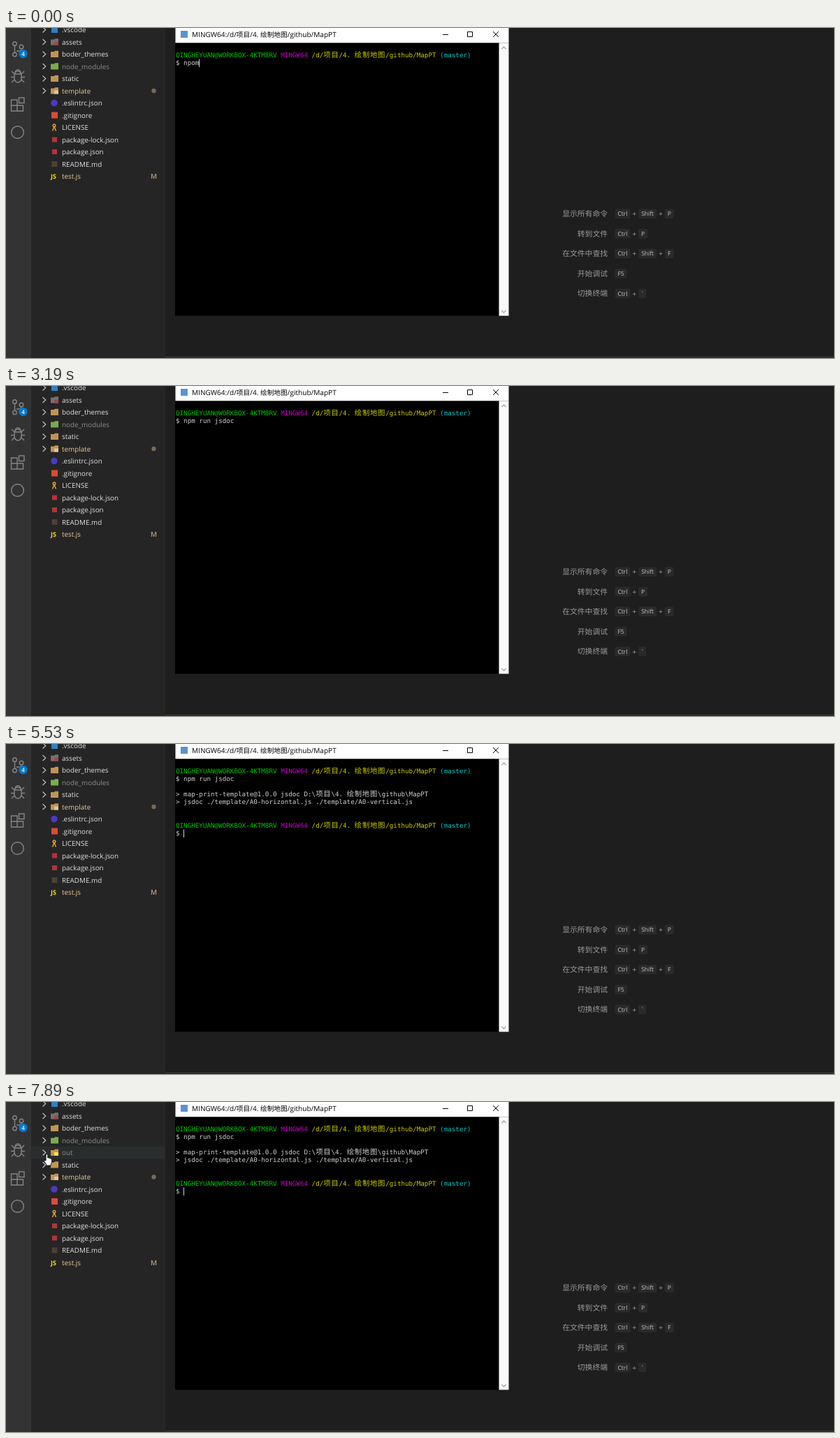
Animation, 1185 px wide and 473 px high, one loop 8000 ms. Source, as an HTML page:

```html
<!DOCTYPE html>
<html lang="zh">
<head>
<meta charset="utf-8">
<title>Terminal and file tree</title>
<style>
  html, body { margin: 0; width: 100%; height: 100%; overflow: hidden; background: #1e1e1e; }
  svg { display: block; }
  text { white-space: pre; text-rendering: geometricPrecision; }
  .term { font: 9.24px "DejaVu Sans Mono", monospace; fill: #d0d0d0; }
  .tree { font: 9.87px "Open Sans", sans-serif; fill: #e0e0e0; }
  .title { font: 10.07px "Open Sans", sans-serif; fill: #000; }
  .hint { font: 10.8px "Noto Sans CJK SC", "Noto Sans CJK", sans-serif; fill: #9a9a9a; text-anchor: end; }
  .key { font: 8.5px "Open Sans", sans-serif; fill: #c4c4c4; text-anchor: middle; }
  .plus { font: 10.5px "Open Sans", sans-serif; fill: #9a9a9a; text-anchor: middle; }
  .cjk { font-family: "Noto Sans CJK SC", "Noto Sans CJK", sans-serif; }
  .term .cjk { font-size: 10.4px; letter-spacing: .72px; }
  .title .cjk { font-size: 9.7px; }
  .line { fill: none; stroke: #858585; stroke-width: 1.4; }
  .thin { fill: none; stroke: #000; }
</style>
</head>
<body>
<svg width="1185" height="473" viewBox="0 0 1185 473">
  <rect width="36" height="473" fill="#333"/>
  <rect x="36" width="192" height="473" fill="#252526"/>
  <rect x="228" y="471" width="957" height="1" fill="#414141"/>

  <g class="line">
    <circle cx="12.500" cy="22.500" r="2.800"/><circle cx="12.500" cy="38" r="2.800"/><circle cx="22" cy="27" r="2.800"/>
    <path d="M12.500 25.500V35M22 30Q22 33 18 33H15"/>
    <path d="M12 67a5 5 0 0 1 10 0v5a5 6 0 0 1-10 0zM13 64a4 4 0 0 1 8 0M12 66H22M12 66 8 62M22 66l4-4M12 70.500H7M22 70.500h5M12 74l-4 4M22 74l4 4"/>
    <path d="M7.500 103h8.500v16H7.500zM7.500 111H24.500v8H16M18.500 100h7.500v7.500h-7.500z"/>
    <circle cx="16.500" cy="149.500" r="8.800"/>
  </g>
  <circle cx="24.500" cy="37" r="6.200" fill="#007acc"/>
  <text x="24.500" y="40" font-family="Open Sans, sans-serif" font-size="8" font-weight="600" text-anchor="middle" fill="#fff">4</text>

  <rect id="hover" x="36" width="192" height="17.500" fill="#2a2d2e"/>
  <g id="tree"></g>
  <g id="hints"></g>

  <rect x="242.500" width="477" height="21.500" fill="#fff"/>
  <rect x="242" y="21.500" width="464" height="391" fill="#000"/>
  <rect x="705.500" y="21.500" width="14" height="391" fill="#fafafa"/>
  <path d="M709.500 30l3-3 3 3M709.500 405l3 3 3-3" fill="none" stroke="#a5a5a5" stroke-width="1.300"/>
  <rect x="250" y="4" width="10" height="10" fill="#5b93cf"/>
  <path class="thin" d="M625 9.500h8M660.500 5.500h7v7h-7zM697 5l8 8M705 5l-8 8"/>
  <g id="terminal"></g>

  <rect id="caret" width="1" height="11.500" fill="#d0d0d0"/>
  <path id="beam" d="M249.500 36.500h2l.5.500.5-.500h2M252 37v11M249.500 48.500h2l.5-.500.5.500h2" fill="none" stroke="#fff"/>
  <path id="hand" d="M-1.400 9V1a1.300 1.300 0 0 1 2.600 0V5l1.200-.300 1 .900 1.200-.100.900 1 1 .100.600 1V11l-1.200 3v2H-.800V14.400L-3.600 10.500q-.800-2 .6-1.800z" fill="#fff" stroke="#000" stroke-width=".8"/>
</svg>
<script>
const $ = id => document.getElementById(id);
const CELL = 5.56, LINE = 11.15, ROW = 17.5, LOOP = 8000;
const withCjk = s => s.replace(/[\u4e00-\u9fff]+/g, m => `<tspan class="cjk">${m}</tspan>`);
const label = (cls, x, y, s, extra = '') => `<text class="${cls}" x="${x}" y="${y}" ${extra}>${withCjk(s)}</text>`;

// File tree: icons are drawn around a row centre at y = 0
const square = (color, size = 9) => `<rect x="${69.5 - size / 2}" y="${-size / 2}" width="${size}" height="${size}" fill="${color}"/>`;
const disc = color => `<circle cx="69" r="4.800" fill="${color}"/>`;
const folder = (color, mark) => `<path d="M64-3.500h5l1-1.200h5V4.500H64z" fill="${color}"/>` +
  (mark ? `<rect x="69" y="-.5" width="6" height="5" fill="${mark}"/>` : '');
const person = `<g fill="none" stroke="#e0a030" stroke-width="1.500"><circle cx="69" cy="-2.700" r="1.800"/><path d="M69-1 66.500 5M69-1l2.500 6"/></g>`;
const jsIcon = `<text x="64" y="3.500" font-family="Open Sans, sans-serif" font-size="9" font-weight="700" fill="#f5de19">JS</text>`;
const GREY = '#8c8c8c', SAND = '#eac690', TAN = '#c09553';

function entry(index, name, icon, color = '#e0e0e0', isFolder = false, extra = '') {
  const chevron = isFolder ? '<path d="M52.500-4 56.800 0 52.500 4" fill="none" stroke="#c5c5c5" stroke-width="1.100"/>' : '';
  return `<g transform="translate(0 ${2.5 + index * ROW})">${chevron}${icon}` +
    label('tree', 80, 3.6, name, `style="fill:${color}"`) + extra + '</g>';
}
const dir = (i, name, icon, color, extra) => entry(i, name, icon, color, true, extra);

$('tree').innerHTML =
  dir(0, '.vscode', square('#2f80c2')) +
  dir(1, 'assets', folder('#76706e', '#9a4a4c')) +
  dir(2, 'boder_themes', folder(TAN)) +
  dir(3, 'node_modules', folder('#7cab4b'), GREY) +
  `<g id="out">${dir(4, 'out', folder(TAN, '#ffe14d'), GREY)}</g><g id="lower">` +
  dir(4, 'static', folder(TAN)) +
  dir(5, 'template', folder(TAN, '#d9c5a5'), SAND, '<circle cx="211.500" r="3.200" fill="#7b6a55"/>') +
  entry(6, '.eslintrc.json', disc('#4b39c4')) +
  entry(7, '.gitignore', square('#dd4c35')) +
  entry(8, 'LICENSE', person) +
  entry(9, 'package-lock.json', square('#b2343a', 7)) +
  entry(10, 'package.json', square('#b2343a', 7)) +
  entry(11, 'README.md', square('#4d4033', 8)) +
  entry(12, 'test.js', jsIcon, SAND, false, label('tree', 207, 3.6, 'M', 'style="fill:#b99d74;font-weight:600"')) +
  '</g>';

// Shortcut hints
const keyWidth = { Ctrl: 22, Shift: 26, P: 13, F: 13, F5: 17, '`': 11 };
function hint(index, name, keys) {
  const y = 266.3 + index * 28.55;
  let x = 871.5, out = label('hint', 861, y + 3.8, name);
  keys.forEach((key, i) => {
    if (i) { out += label('plus', x + 5.8, y + 4, '+'); x += 11.6; }
    const w = keyWidth[key];
    out += `<rect x="${x}" y="${y - 6.8}" width="${w}" height="13.500" rx="2" fill="#2a2a2a"/>` + label('key', x + w / 2, y + 3, key);
    x += w;
  });
  return out;
}
$('hints').innerHTML = [
  ['显示所有命令', ['Ctrl', 'Shift', 'P']],
  ['转到文件', ['Ctrl', 'P']],
  ['在文件中查找', ['Ctrl', 'Shift', 'F']],
  ['开始调试', ['F5']],
  ['切换终端', ['Ctrl', '`']]
].map(([name, keys], i) => hint(i, name, keys)).join('');

// Terminal
const termLine = (row, s, extra) => label('term', 243, 41.5 + row * LINE, s, extra);
const paint = (color, s) => `<tspan fill="${color}">${s}</tspan>`;
const prompt = paint('#00c800', 'QINGHEYUAN@WORKBOX-4KTM8RV') + ' ' + paint('#c800c8', 'MINGW64') + ' ' +
  paint('#cccc00', '/d/项目/4. 绘制地图/github/MapPT') + ' ' + paint('#00c8c8', '(master)');

$('terminal').innerHTML =
  label('title', 266, 12.8, 'MINGW64:/d/项目/4. 绘制地图/github/MapPT') +
  termLine(0, prompt) + termLine(1, '', 'id="command"') +
  '<g id="output">' +
  termLine(3, '> map-print-template@1.0.0 jsdoc D:\\项目\\4. 绘制地图\\github\\MapPT') +
  termLine(4, '> jsdoc ./template/A0-horizontal.js ./template/A0-vertical.js') +
  '</g><g id="next">' + termLine(7, prompt) + termLine(8, '$ ') + '</g>';

// Timelines: [start, value]
const typing = [[0, 'npom'], [280, 'npo'], [530, 'np'], [930, 'npm'], [1080, 'npm '], [1230, 'npm r'],
  [1350, 'npm run'], [1600, 'npm run '], [2060, 'npm run j'], [2180, 'npm run js'],
  [2460, 'npm run jsdo'], [2730, 'npm run jsdoc']];
const caretRows = [[0, 1], [3190, 0], [3590, 2], [3990, 0], [4580, 2], [4700, 6], [5130, 0],
  [5530, 8], [6050, 0], [6640, 8], [7100, 0], [7650, 8]];
// Pointer position and hovered row, which lags behind it
const pointer = [[0, null], [7260, [196, 2, 0]], [7410, [85, 36, 1]], [7530, [74, 49, 2]],
  [7650, [66, 62, 3]], [7770, [61, 71, 4]], [7890, [58.5, 75, 4]]];

const at = (line, t) => line.findLast(([start]) => t >= start)[1];
const show = (id, on) => $(id).style.display = on ? '' : 'none';

function render(t) {
  const typed = at(typing, t), row = at(caretRows, t), hand = at(pointer, t);
  const command = '$ ' + typed;
  if ($('command').textContent !== command) $('command').textContent = command;

  show('caret', row);
  const col = row === 1 ? command.length : row === 8 ? 2 : 0;
  $('caret').setAttribute('x', Math.round(243.12 + col * CELL));
  $('caret').setAttribute('y', 33.3 + row * LINE);

  show('output', t >= 4700);
  show('next', t >= 5530);
  show('out', t >= 5930);
  $('lower').setAttribute('transform', `translate(0 ${t >= 5930 ? ROW : 0})`);

  show('beam', t >= 7100 && t < 7260);
  show('hand', hand);
  show('hover', hand);
  if (hand) {
    $('hand').setAttribute('transform', `translate(${hand[0]} ${hand[1]})`);
    $('hover').setAttribute('y', 2.5 + (hand[2] - 0.5) * ROW);
  }
}

const begin = performance.now();
function tick() {
  render((performance.now() - begin) % LOOP);
  requestAnimationFrame(tick);
}
tick();
</script>
</body>
</html>
```
